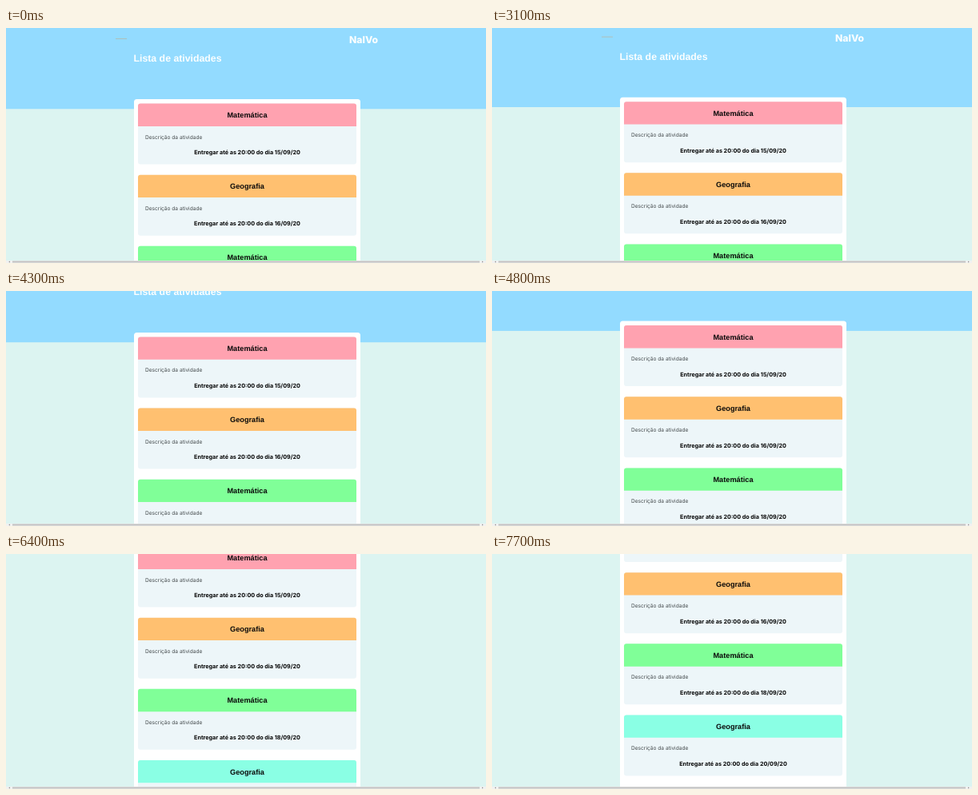
Animation, 600 px wide and 294 px high, one loop 7800 ms. Source, as an HTML page:

```html
<!DOCTYPE html>
<html lang="pt-BR">
<head>
<meta charset="utf-8">
<title>Lista de atividades</title>
<style>
  html, body { margin: 0; width: 100%; height: 100%; overflow: hidden; background: #dcf4f1; }
  svg { display: block; width: 100%; height: 100%; }
  text { text-rendering: geometricPrecision; }
  .heading { font: bold 12.3px "Liberation Sans", Arial, sans-serif; fill: #fafeff; }
  .brand { font: 800 12.2px Inter, sans-serif; fill: #fafeff; }
  .subject { font: bold 9.2px "Liberation Sans", Arial, sans-serif; text-anchor: middle; fill: #0a0a0a; }
  .note { font: 6.6px Inter, sans-serif; fill: #454b4d; }
  .due { font: 700 7.2px Inter, sans-serif; text-anchor: middle; fill: #050505; }
</style>
</head>
<body>
<svg viewBox="0 0 600 294" preserveAspectRatio="none">
  <rect width="600" height="294" fill="#dcf4f1"/>
  <g id="page">
    <rect width="600" height="101.3" fill="#93dbff"/>
    <rect x="137" y="13" width="14" height=".8" fill="#b5b8a8"/>
    <text class="brand" x="429" y="19.4">NalVo</text>
    <text class="heading" x="159.5" y="42.3">Lista de atividades</text>
    <rect x="160" y="89" width="283" height="370" rx="3.5" fill="#fff"/>
    <g id="cards"></g>
  </g>
  <g id="scrollbar">
    <rect y="291" width="600" height="3" fill="#f1f1f1"/>
    <rect x="8" y="291.5" width="584" height="2" fill="#c1c1c1"/>
    <path d="M3.4 292.5l1.4-1v2zM596.6 292.5l-1.4-1v2z" fill="#777"/>
  </g>
</svg>
<script>
const LOOP = 7800, STEP = 100, CARD_PITCH = 89.15;

const activities = [
  ["Matemática", 15, "#ffa2b0"],
  ["Geografia", 16, "#ffc070"],
  ["Matemática", 18, "#80ff98"],
  ["Geografia", 20, "#8affe4"]
];

// [time in ms, scroll distance in px]
const scrollPath = [
  [2900, 0], [3000, 0.7], [3100, 2.3], [3800, 22.8], [4800, 51.4], [5150, 61.8],
  [5500, 72.5], [5950, 87.6], [6400, 104], [7000, 128.5], [7700, 160.5]
];

document.getElementById("cards").innerHTML = activities.map(([subject, day, color], i) => `
  <g transform="translate(165 ${94.5 + i * CARD_PITCH})">
    <rect width="273" height="76" rx="3" fill="#edf6f9"/>
    <path d="M0 28.4V3q0-3 3-3h267q3 0 3 3v25.4z" fill="${color}"/>
    <text class="subject" x="136.5" y="17.6">${subject}</text>
    <text class="note" x="9" y="44">Descrição da atividade</text>
    <text class="due" x="136.5" y="63.7">Entregar até as 20:00 do dia ${day}/09/20</text>
  </g>`).join("");

function scrollAt(time) {
  const next = scrollPath.findIndex(([t]) => t >= time);
  if (next === 0) return 0;
  const [t0, y0] = scrollPath[next - 1];
  const [t1, y1] = scrollPath[next];
  return y0 + (y1 - y0) * (time - t0) / (t1 - t0);
}

const page = document.getElementById("page");

function draw() {
  const time = Math.floor(performance.now() % LOOP / STEP) * STEP;
  page.setAttribute("transform", `translate(0 ${-scrollAt(time)})`);
  requestAnimationFrame(draw);
}
draw();
</script>
</body>
</html>
```
